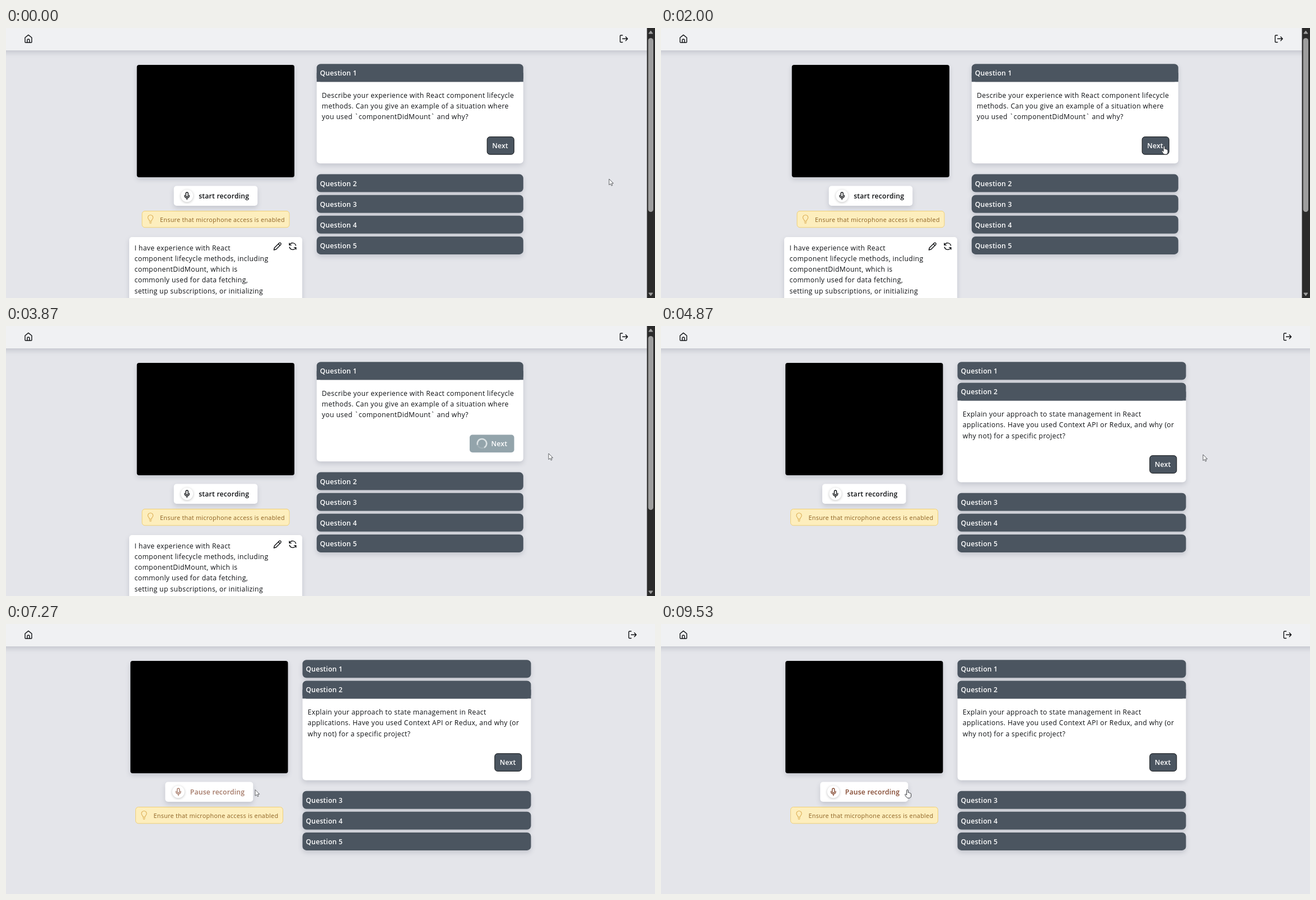
These frames come from a looping animation (1159x483 px, 9600 ms). An HTML page:

```html
<!DOCTYPE html>
<html lang="en">
<head>
<meta charset="utf-8">
<title>Interview questions</title>
<style>
  html, body { margin: 0; width: 100%; height: 100%; overflow: hidden; background: #e4e5ea; }
  svg { display: block; width: 100vw; height: 100vh; }
  text { font: 12.2px "Open Sans", "Noto Sans", sans-serif; letter-spacing: .37px; fill: #0e1013; white-space: pre; }
  .bold { font-weight: 600; letter-spacing: .2px; }
  .light { fill: #fff; }
  .tip { font-size: 10.8px; letter-spacing: .29px; fill: #8d6122; }
  .icon { fill: none; stroke: #0e1013; stroke-width: 1.4; stroke-linecap: round; stroke-linejoin: round; }
  .shadow { filter: drop-shadow(0 4px 4px rgba(30, 40, 60, .16)); }
  .soft { filter: drop-shadow(0 1px 2px rgba(0, 0, 0, .25)); }
  .pause text { fill: #81442c; }
  .pause .icon { stroke: #81442c; }
</style>
</head>
<body>
<svg id="stage" viewBox="0 0 1159 483" preserveAspectRatio="none"></svg>
<script>
const LOOP = 9600;
const LOADING_AT = 2270, NEXT_PAGE_AT = 4070, RECORD_AT = 6400;
const SLATE = '#4b5560';

const rect = (x, y, w, h, fill, r = 0, extra = '') =>
  `<rect x="${x}" y="${y}" width="${w}" height="${h}" rx="${r}" fill="${fill}" ${extra}/>`;
const text = (x, y, value, cls = '') => `<text x="${x}" y="${y}" class="${cls}">${value}</text>`;
const icon = (d, extra = '') => `<path class="icon" d="${d}" ${extra}/>`;
const group = (content, attrs = '') => `<g ${attrs}>${content}</g>`;
const shift = (dx, content) => group(content, `transform="translate(${dx} 0)"`);
const lines = (x, y, list) => list.map((line, i) => text(x, y + i * 19.2, line)).join('');

function header(width) {
  return rect(-10, -10, width + 20, 50, '#f0f1f3', 0, 'class="shadow"') +
    icon('M34 17.3 40 12.4 46 17.3V25Q46 26 45 26H35Q34 26 34 25ZM38 26V21.8Q38 20 40 20T42 21.8V26') +
    shift(width - 1143, icon('M1100.5 13H1097.5Q1096.2 13 1096.2 14.3V24.2Q1096.2 25.5 1097.5 25.5H1100.5M1100.5 19.3H1109.5M1106.2 15.8 1109.5 19.3 1106.2 22.8'));
}

function recordButton(x, width, label, attrs = '') {
  const cx = x + 23.5;
  const mic = `M${cx - 2} 296a2 2 0 0 1 4 0v4a2 2 0 0 1-4 0ZM${cx - 4.2} 299.3v.7a4.2 4.2 0 0 0 8.4 0v-.7M${cx} 304.3v2.6`;
  return group(rect(x, 282.5, width, 35.5, '#fff', 5, 'class="shadow"') +
    `<circle class="soft" cx="${cx}" cy="300.3" r="11" fill="#fff"/>` +
    group(icon(mic) + text(x + 44.5, 305, label, 'bold'), 'class="label"'), attrs);
}

function mediaColumn(dx, buttons) {
  return shift(dx, rect(233.7, 66, 281.3, 201, '#000', 4, 'class="shadow"') +
    rect(243, 327.5, 263, 29.3, '#fdeebd', 5, 'stroke="#efcf77"') +
    icon('M256.1 345.2Q256.1 343.6 255 342.6A4.6 4.6 0 1 1 261 342.6Q259.9 343.6 259.9 345.2ZM256.2 347.2H259.8M256.8 349.2H259.2', 'style="stroke:#dcae55;stroke-width:1.1"') +
    text(275, 346.6, 'Ensure that microphone access is enabled', 'tip')) + buttons;
}

function nextButton(right, y, attrs = '') {
  return group(rect(right - 48.5, y, 48, 31.5, SLATE, 5, 'stroke="#0c0f12"') +
    text(right - 39.5, y + 20.4, 'Next', 'bold light'), attrs);
}

function questions(x, width, open, body) {
  let y = 64.3, out = '';
  for (let n = 1; n <= 5; n++) {
    const isOpen = n === open;
    if (isOpen) out += rect(x, y, width, 178, '#fff', 6, 'class="shadow"');
    out += rect(x, y, width, 32, SLATE, 7, isOpen ? '' : 'class="shadow"');
    if (isOpen) out += rect(x, y + 16, width, 16, SLATE) + lines(x + 9.3, y + 60.7, body);
    out += text(x + 6, y + 21, 'Question ' + n, 'bold light');
    y += isOpen ? 197.3 : 37.1;
  }
  return out;
}

function answerCard() {
  return rect(220, 374, 309, 140, '#fff', 5, 'class="shadow"') +
    lines(229.5, 397.8, ['I have experience with React', 'component lifecycle methods, including',
      'componentDidMount, which is', 'commonly used for data fetching,', 'setting up subscriptions, or initializing']) +
    icon('M478.4 397 479.4 393.2 488 384.6Q489.4 383.6 490.6 384.8T490.8 387.4L482.2 396ZM486.3 386.3 489.1 389.1') +
    icon('M506 385V388.4H509.4M506.3 388.2A6 6 0 0 1 517.6 389M517.9 396V392.6H514.5M517.6 392.8A6 6 0 0 1 506.3 392');
}

function scrollbar() {
  return rect(1144.6, 0, 15, 483, '#2b2b2b') + rect(1146.8, 18, 9.2, 311, '#9e9e9e', 4.6) +
    '<path fill="#9e9e9e" stroke="#9e9e9e" stroke-linejoin="round" d="M1151.4 5 1155 10H1147.8ZM1151.4 479 1155 474H1147.8Z"/>';
}

function loadingButton() {
  return group(rect(828, 194.5, 79.5, 31.8, '#93a4ab', 5, 'id="loadingFill"') +
    '<circle cx="850" cy="210.3" r="8.3" fill="none" stroke="#fff" stroke-opacity=".12" stroke-width="2.6"/>' +
    '<path id="spinner" d="M855.2 216.8A8.3 8.3 0 1 1 855.2 203.8" fill="none" stroke="#dbe2e4" stroke-width="2.6"/>' +
    text(866.5, 214.9, 'Next', 'bold light'), 'id="loading"');
}

document.getElementById('stage').innerHTML =
  rect(0, 0, 1159, 483, '#e4e5ea') +
  group(header(1143.5) + mediaColumn(0, recordButton(299.7, 149.5, 'start recording')) + answerCard() +
    questions(554.8, 369, 1, ['Describe your experience with React component lifecycle',
      'methods. Can you give an example of a situation where', 'you used `componentDidMount` and why?']) +
    nextButton(907.7, 194.7, 'id="next"') + loadingButton() + scrollbar(), 'id="firstPage"') +
  group(header(1159) + mediaColumn(-11.5,
      recordButton(288, 149.5, 'start recording', 'id="start"') +
      recordButton(284.3, 157, 'Pause recording', 'id="pause" class="pause"')) +
    questions(529.5, 408, 2, ['Explain your approach to state management in React',
      'applications. Have you used Context API or Redux, and why (or', 'why not) for a specific project?']) +
    nextButton(921.3, 231.8), 'id="secondPage"') +
  group('<path id="arrow" d="M0 0V10.8L2.6 8.6 4.3 12.2 6 11.4 4.4 7.9H7.7Z" fill="#fff" stroke="#4a4d52" stroke-width=".9"/>' +
    '<path id="hand" d="M-1.3 1.2Q-1.3 0 0 0T1.3 1.2V5Q2.8 4.4 3.4 5.6 4.7 5.2 5.2 6.4 6.6 6.2 6.6 7.8V10.5Q6.6 14.8 3 14.8H1Q-.7 14.8-1.8 13L-4.3 9.2Q-4.5 8-3.4 7.9T-1.3 9.5Z" fill="#fff" stroke="#33363a"/>', 'id="cursor"');

const el = Object.fromEntries([...document.querySelectorAll('[id]')].map(e => [e.id, e]));
const pauseLabel = el.pause.querySelector('.label');
const show = (node, visible) => node.setAttribute('display', visible ? 'inline' : 'none');
const ease = u => u < .5 ? 2 * u * u : 1 - 2 * (1 - u) ** 2;

// Cursor stops: time, x, y
const path = [[0, 1077, 270], [1000, 985, 233], [1500, 985, 233], [2100, 893.5, 210], [2800, 893.5, 210],
  [3500, 969, 228], [4300, 969, 228], [4530, 968, 230], [4870, 968, 230], [6070, 437, 297],
  [6800, 437, 297], [7200, 445, 296.5], [9070, 445, 296.5], [9400, 440, 296.5], [LOOP, 440, 296.5]];

function cursorAt(t) {
  const i = path.findIndex(stop => stop[0] > t);
  const [t0, x0, y0] = path[i - 1], [t1, x1, y1] = path[i];
  const u = ease((t - t0) / (t1 - t0));
  return [x0 + (x1 - x0) * u, y0 + (y1 - y0) * u];
}

function draw(t) {
  const second = t >= NEXT_PAGE_AT, loading = t >= LOADING_AT, recording = t >= RECORD_AT;
  show(el.firstPage, !second);
  show(el.secondPage, second);
  show(el.next, !loading);
  show(el.loading, loading);
  show(el.start, !recording);
  show(el.pause, recording);

  const [x, y] = cursorAt(t);
  el.loadingFill.setAttribute('fill', x < 907 ? '#7b979d' : '#93a4ab');
  el.spinner.setAttribute('transform', `rotate(${(t - LOADING_AT) * .36 - 104} 850 210.3)`);
  pauseLabel.setAttribute('opacity', .85 + .15 * Math.cos((t - RECORD_AT) / 1500 * 2 * Math.PI));

  const overNext = !loading && x > 859 && x < 907 && y < 226;
  const overRecord = second && x < (recording ? 441 : 437.5) && y > 283;
  const pointing = overNext || overRecord;
  show(el.hand, pointing);
  show(el.arrow, !pointing);
  el.cursor.setAttribute('transform', `translate(${x} ${y})`);
}

function tick() {
  draw(performance.now() % LOOP);
  requestAnimationFrame(tick);
}
tick();
</script>
</body>
</html>
```
